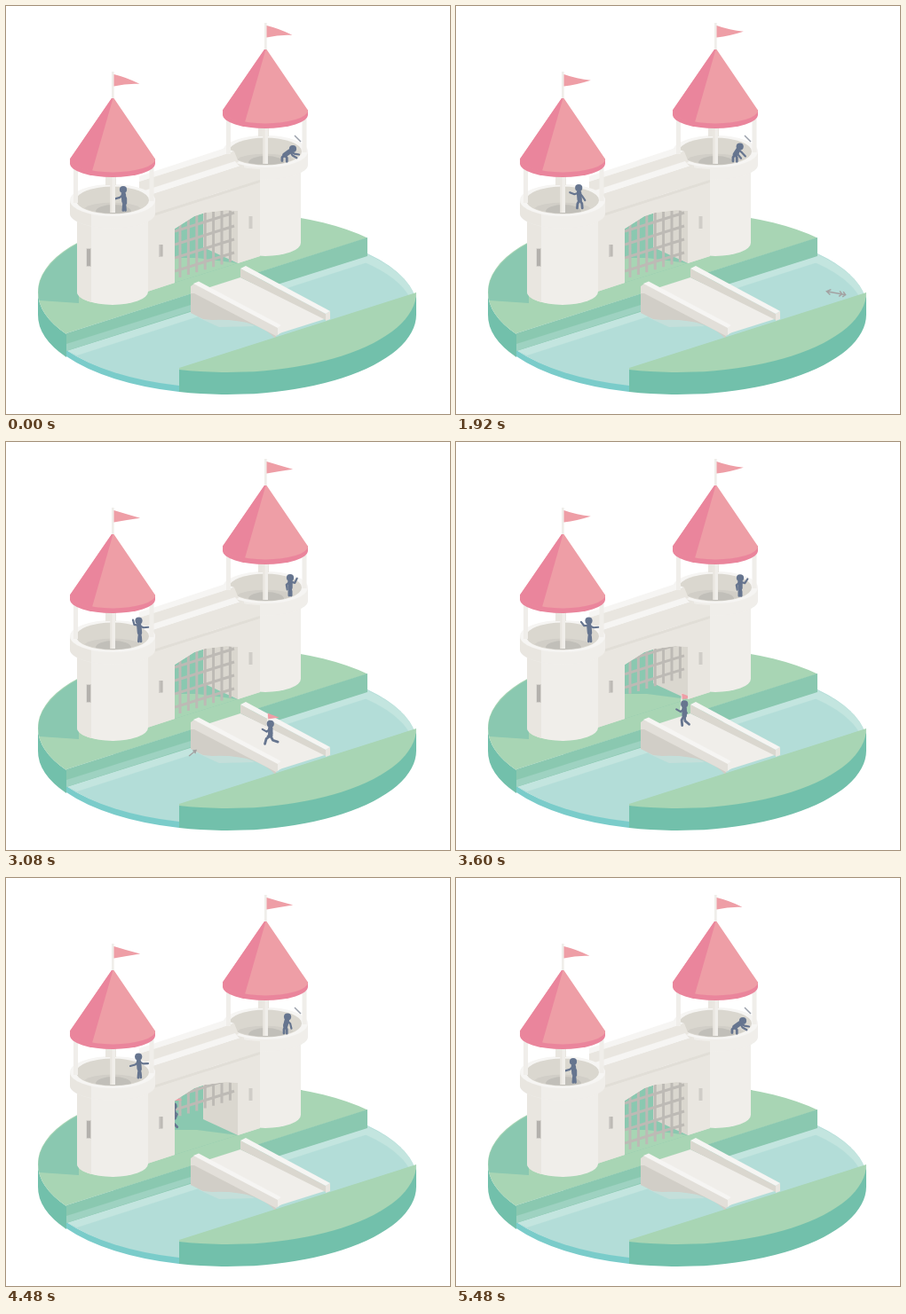
These frames come from a looping animation (500 by 460 pixels, 5.52 s). An HTML page:

```html
<!DOCTYPE html>
<html lang="en">
<head>
<meta charset="utf-8">
<title>Castle</title>
<style>
html, body { margin: 0; width: 100%; height: 100%; overflow: hidden; background: #fff; }
svg { display: block; width: 500px; height: 460px; }
</style>
</head>
<body>
<svg id="stage" viewBox="0 0 500 460"></svg>
<script>
const LOOP = 5520;
const C = {
  grass: '#a8d5b4', shade: '#8ac8b0', side: '#72c0ab',
  water: '#b3ddd8', shallow: '#c3e5df', waterSide: '#7accca',
  top: '#f6f5f3', light: '#f0eeea', mid: '#e9e6e0', dull: '#dad7cf', dark: '#d1cec7',
  pink: '#ee9ea6', rose: '#ea859c', man: '#66758f', iron: '#bdbab5', arrow: '#a3a2a2'
};

const path = (d, fill) => `<path d="${d}" fill="${fill}"/>`;
const rect = (x, y, w, h, fill) => `<rect x="${x}" y="${y}" width="${w}" height="${h}" fill="${fill}"/>`;
const oval = (x, y, rx, ry, fill) => `<ellipse cx="${x}" cy="${y}" rx="${rx}" ry="${ry}" fill="${fill}"/>`;
const line = (d, color, w) => `<path d="${d}" fill="none" stroke="${color}" stroke-width="${w}"/>`;
const at = (x, y, body) => `<g transform="translate(${x} ${y})">${body}</g>`;
const slot = id => `<g id="${id}"></g>`;

// Both towers share one shape; the far one sits 172 right and 55 up.
const FAR = [172, -55];
const towerBody =
  path('M80 236V322A40 15 0 0 0 160 322V236Z', C.light) +
  path('M80 236V322A40 15 0 0 0 96 334V236Z', C.mid);
const towerRing =
  path('M72 219V234A48 16.5 0 0 0 168 234V219Z', C.light) +
  path('M72 219V234A48 16.5 0 0 0 96 248.3V230Z', C.mid) +
  oval(120, 219, 48, 18, C.top) +
  oval(120, 219, 41, 15.5, C.dull) +
  path('M88 228A34 10 0 0 1 152 228A41 15.5 0 0 1 88 228Z', C.dark) +
  path('M101 232A20 8 0 0 1 141 232A41 15.5 0 0 1 101 232Z', '#c1bfb9') +
  rect(112, 188, 12, 14, C.mid);
const towerRoof =
  rect(76, 178, 5, 44, C.light) + rect(161.5, 178, 5, 42, C.light) +
  rect(117.5, 188, 5.5, 45, C.light) + rect(117.5, 188, 2, 45, C.mid) +
  path('M72 172V177.5A48 15.5 0 0 0 168 177.5V172Z', C.rose) +
  path('M119 104Q120 102 121.5 104L168 172.5A48 15 0 0 1 72 172.5Z', C.pink) +
  path('M119 104Q120 102 120.5 104L97 186A48 15 0 0 1 72 172.5Z', C.rose) +
  rect(119, 74, 2.7, 30, C.light);

const ground =
  path('M36 323A213 90 0 0 0 68 370V396A213 90 0 0 1 36 348Z', C.side) +
  path('M68 388A213 90 0 0 0 195 427V435A213 90 0 0 1 68 395Z', C.waterSide) +
  path('M68 388L407 279A213 90 0 0 1 462 341L195 428A213 90 0 0 1 68 388Z', C.water) +
  path('M68 388L407 281V289L80 394Z', C.shallow) +
  path('M407 280A213 90 0 0 1 461 328L455 329A205 85 0 0 0 404 289Z', C.shallow) +
  path('M68 370A213 90 0 0 1 36 323A213 90 0 0 1 407 261.5L68 369Z', C.grass) +
  path('M37.6 332A213 90 0 0 1 82 267V335Z', C.shade) +
  path('M68 369L407 261V282L68 389Z', C.shade) +
  path('M68 381L208 337V344L68 389Z', '#9ed2c1');

const bridge =
  path('M216 351L232 353Q262 350 280 361L240 362Z', '#c4dfda') +
  path('M214 322L264 306L362 352L308 369Z', C.light) +
  path('M264 296L360 347V354L264 306Z', C.dull) +
  path('M360 347L365 344V353L360 355Z', C.mid) +
  path('M264 296L270 293L365 344L360 347Z', C.top) +
  path('M208 318L304 368V376Q284 352 232 354L222 353L208 346Z', C.dark) +
  path('M208 316L212 313L306 362V371L304 372L212 324L208 324Z', '#e2dfd9') +
  path('M211 313L217 310.5L310 360L306 363Z', C.top) +
  path('M306 363L310 360V368L306 371Z', C.light);

const slab =
  path('M195 408A213 90 0 0 0 462 323V348A213 90 0 0 1 195 435Z', C.side) +
  path('M195 408L462 323A213 90 0 0 1 195 410Z', C.grass);

const ARCH = 'V251L212 237L224 233L248 230L261 231V290';
const OPENING = `M190 312${ARCH}Z`;
const gateway =
  path(OPENING, C.shade) +
  path('M190 284H215L261 290L190 312Z', C.grass) +
  path('M222 228H261V290L222 272Z', C.dull);

let bars = '';
for (let x = 196; x < 256; x += 9.4) bars += `M${x} 180V${306 - (x - 196) * .31}`;
for (let y = 297; y > 180; y -= 15) bars += `M190 ${y + 2}L257 ${y - 19}`;

const wall =
  path('M150 192L247 160L257 164L150 198Z', C.top) +
  path('M150 198L257 164L262 176L150 212Z', C.mid) +
  path('M150 210L258 175L263 181L150 217Z', C.top) +
  path('M150 217L262 181Q273 184 286 184V282L261 290V200L190 230V312L150 325Z', C.mid) +
  path(`M150 239L286 196V282L261 290V231L248 230L224 233L212 237L190 251V312L150 325Z`, C.mid) +
  path('M150 217L262 181Q273 184 286 184V196L190 226V251L212 237L224 233L248 230L261 231V204L150 239Z', C.mid) +
  path('M150 239L286 196V199L150 242Z', '#e1ded7') +
  rect(172, 269, 4.5, 14, '#d0cdc8') + rect(173.5, 269, 3, 13, C.iron) +
  rect(273.5, 237, 4, 14, '#d0cdc8');

const slit = rect(90.5, 273, 5.5, 21, '#d4d1cc') + rect(91, 274, 4, 19, '#b3b0ac');

const stage = document.getElementById('stage');
stage.innerHTML =
  `<clipPath id="opening"><path d="${OPENING}"/></clipPath>` +
  ground + bridge + slab + at(...FAR, towerBody + towerRing) + gateway +
  `<g clip-path="url(#opening)"><path id="gate" d="${bars}" fill="none" stroke="${C.iron}" stroke-width="3"/></g>` +
  slot('runner') + wall + slot('farGuard') + at(...FAR, towerRoof) +
  towerBody + slit + towerRing + slot('nearGuard') + towerRoof +
  slot('flags') + slot('arrows');

const el = id => document.getElementById(id);
const lerp = (a, b, k) => a + (b - a) * k;
const clamp = k => Math.max(0, Math.min(1, k));
const ease = k => (k = clamp(k)) * k * (3 - 2 * k);

// Rises from 0 to 1 between a and b, and falls back between c and d.
const pulse = (t, a, b, c, d) => ease((t - a) / (b - a)) - ease((t - c) / (d - c));

// Two equal segments; angles in degrees from straight down, positive to the right.
function limb(x, y, [upper, lower], size, width) {
  let d = `M${x} ${y}`;
  for (const angle of [upper, lower]) {
    x += size * Math.sin(angle * Math.PI / 180);
    y += size * Math.cos(angle * Math.PI / 180);
    d += `L${x} ${y}`;
  }
  return line(d, C.man, width);
}

// (x, y) is the head; (hipX, hipY) is relative to it.
function man(x, y, hipX, hipY, arms, legs, legSize = 5) {
  const neckX = hipX * .35, neckY = hipY * .4;
  return `<g transform="translate(${x} ${y})" stroke-linecap="round" stroke-linejoin="round">` +
    legs.map(a => limb(hipX, hipY, a, legSize, 2.8)).join('') +
    line(`M${neckX} ${neckY}L${hipX} ${hipY}`, C.man, 5.4) +
    arms.map(a => limb(neckX, neckY, a, 5.5, 2.2)).join('') +
    `<circle r="4.1" fill="${C.man}"/></g>`;
}

function nearGuard(t) {
  const out = pulse(t, 1700, 2250, 4400, 5420);
  const cheer = pulse(t, 1700, 2200, 3450, 3900);
  const step = 22 * Math.sin(Math.PI * out);
  const left = [lerp(-50, -100, cheer), lerp(-75, -165, cheer)];
  const right = [lerp(30, 65, out), lerp(0, 95, out)];
  return man(132 + 17.5 * out, 207 - 5.5 * out, 1, 13.5, [left, right],
    [[-8 - step, -5], [12 + step, 5]]);
}

function farGuard(t) {
  const up = pulse(t, 1700, 2200, 4300, 4850);
  const point = pulse(t, 2600, 3000, 4100, 4500);
  const raise = point * (1 - ease((t - 3500) / 400));
  const left = [lerp(30, -50, up), lerp(60, 10, up)];
  const right = [lerp(60, 40, up) + 35 * point, lerp(80, -10, up) + 115 * point + 50 * raise];
  const spear = line('M325 146L332 153', '#9ca2ac', 1.5);
  const body = man(lerp(323, 315, up) + 5 * point, lerp(161, 155, up) - 2 * raise,
    lerp(-9, 0, up), lerp(7, 11, up), [left, right],
    [[lerp(-50, -14, up), 0], [lerp(35, 14, up), 0]], lerp(4, 4.6, up));
  return (point < .5 ? spear : '') + body;
}

function runner(t) {
  if (t < 1960 || t > 4560) return '';
  const phase = (t - 2360) / 95, swing = Math.sin(phase);
  const x = 354 - .078 * (t - 2360), y = 349 - .0432 * (t - 2360);
  const leg = s => [-12 + 40 * s, 28 + 45 * s];
  const flag = line('M-4 7L-2.5 -12', C.light, 1.5) + path('M-3 -12L10 -7L-2.5 -5.5Z', C.pink);
  return `<g opacity="${clamp((t - 1920) / 120)}">` + at(x, y, flag) +
    man(x, y, 0, 13, [[-50, -120], [40 - 25 * swing, -30 - 25 * swing]],
      [leg(swing), leg(-swing)], 6) + '</g>';
}

// Each shot flies left along a parabola, then sticks for a moment.
function shot(t, start, y0, bend) {
  const x0 = 454, flight = 800, age = t - start;
  if (age < 0 || age > flight + 240) return '';
  const u = Math.min(age, flight) * .305;
  const angle = -Math.atan(2 * bend * u - .28) * 180 / Math.PI;
  const shape = age >= flight - 10
    ? 'M-5 0H5M2 -2L5 0L2 2'
    : 'M-10.5 0H10.5M-6 -3L-10.5 0L-6 3M4 -3L7 0L4 3M8 -3L11 0L8 3';
  return `<g transform="translate(${x0 - u} ${y0 - .28 * u + bend * u * u}) rotate(${angle})">` +
    line(shape, C.arrow, 1.5) + '</g>';
}

function flag(t) {
  const w = Math.cos(t / 1380 * 2 * Math.PI);
  const tipX = 151.2 - .8 * w, tipY = 85.5 + 2.3 * w;
  return path(`M121.5 77Q136 ${81.5 - w} ${tipX} ${tipY}Q136 ${88 - w} 121.5 90.5Z`, C.pink);
}

const began = performance.now();
function draw() {
  const t = (performance.now() - began) % LOOP;
  const lift = 44 * pulse(t, 3350, 3850, 4350, 4900);
  el('gate').setAttribute('transform', `translate(0 ${-lift})`);
  el('runner').innerHTML = runner(t);
  el('nearGuard').innerHTML = nearGuard(t);
  el('farGuard').innerHTML = farGuard(t);
  el('flags').innerHTML = flag(t) + at(...FAR, flag(t));
  el('arrows').innerHTML = shot(t, 1835, 329.6, .002) + shot(t, 2281, 287, .00222);
  requestAnimationFrame(draw);
}
draw();
</script>
</body>
</html>
```
